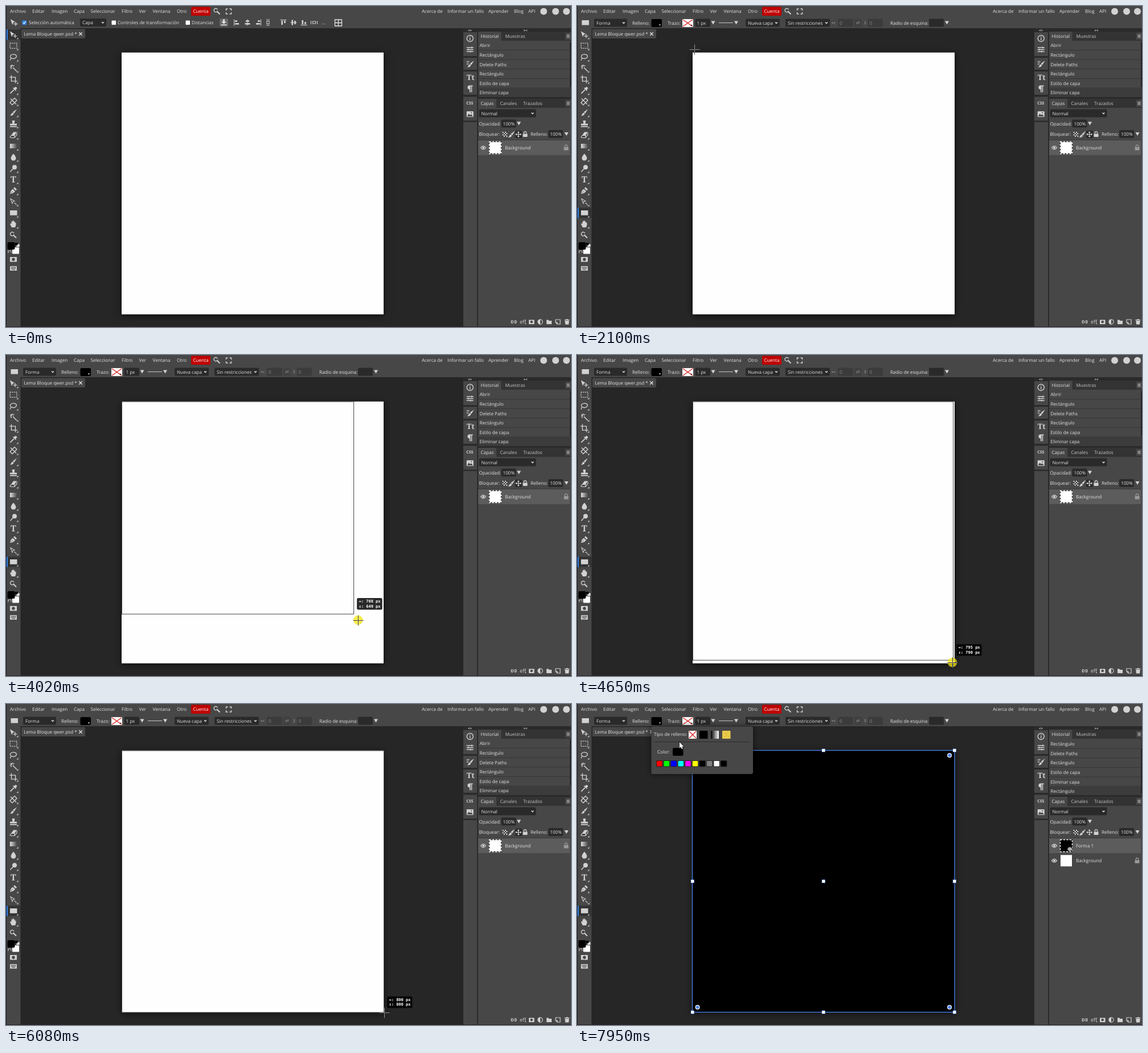
Animation of 992 by 564 pixels, one loop 8 s. Source, as an HTML page with a canvas:

```html
<!DOCTYPE html>
<html lang="es">
<head>
<meta charset="utf-8">
<style>
html, body { margin: 0; width: 100%; height: 100%; overflow: hidden; background: #262626; }
canvas { display: block; }
</style>
</head>
<body>
<canvas id="stage" width="992" height="564"></canvas>
<script>
const c = document.getElementById('stage').getContext('2d');
const LOOP = 8000, ZOOM = 0.575, LEFT = 203, TOP = 81.7, SIZE = 460;
const PANEL = '#474747', DARK = '#2a2a2a', INK = '#e2e2e2', ICON = '#d2d2d2', BLUE = '#4a82ee';

// Pointer track: time, x, y
const track = [
  [70, 815, 543], [260, 650, 500], [540, 220, 402], [820, 24, 366], [890, 19, 365],
  [1230, 19, 365], [1600, 95, 230], [1970, 201, 82], [2100, 206, 76], [2240, 212, 73],
  [2450, 203, 80], [3110, 203, 80], [3330, 276, 157], [3390, 301, 183], [3880, 598, 438],
  [4590, 660, 536], [4650, 659, 540], [4790, 660, 543], [5270, 660, 541], [5410, 660, 541],
  [5470, 664, 542], [6080, 664, 542], [6400, 480, 320], [6700, 253, 64], [6840, 173, 12],
  [6980, 163, 20], [7190, 141, 35], [7530, 141, 35], [7950, 180, 68], [8000, 180, 68]
];

// Monotone cubic interpolation of one coordinate
function coord(t, k) {
  const slope = i => i < 0 || i > track.length - 2 ? 0
    : (track[i + 1][k] - track[i][k]) / (track[i + 1][0] - track[i][0]);
  const tangent = i => {
    const a = slope(i - 1), b = slope(i);
    return a * b > 0 ? 2 * a * b / (a + b) : 0;
  };
  if (t <= track[0][0]) return track[0][k];
  const i = track.findIndex((p, n) => n > track.length - 3 || track[n + 1][0] >= t);
  const p = track[i], q = track[i + 1], h = q[0] - p[0], u = Math.min(1, (t - p[0]) / h);
  const s = u * u * (3 - 2 * u);
  return p[k] + (q[k] - p[k]) * s
    + h * u * (1 - u) * (tangent(i) * (1 - u) - tangent(i + 1) * u);
}
const pointer = t => ({ x: coord(t, 1), y: coord(t, 2) });

function rect(x, y, w, h, color, r = 0) {
  c.fillStyle = color;
  c.beginPath();
  c.roundRect(x, y, w, h, r);
  c.fill();
}
function frame(x, y, w, h, color, width = 1) {
  c.strokeStyle = color;
  c.lineWidth = width;
  c.strokeRect(x, y, w, h);
}
function disc(x, y, r, color) {
  c.fillStyle = color;
  c.beginPath();
  c.arc(x, y, r, 0, 7);
  c.fill();
}
function text(s, x, y, color = INK, font = '8.1px "Open Sans", sans-serif') {
  c.font = font;
  c.fillStyle = color;
  c.fillText(s, x, y + 3);
}
function line(x, y, d, color = ICON, width = 1.1) {
  c.save();
  c.translate(x, y);
  c.strokeStyle = color;
  c.lineWidth = width;
  c.stroke(new Path2D(d));
  c.restore();
}
function solid(x, y, d, color = ICON) {
  c.save();
  c.translate(x, y);
  c.fillStyle = color;
  c.fill(new Path2D(d));
  c.restore();
}
const down = (x, y) => solid(x, y, 'M-3.5-3h7L0 3z');
function select(s, x, y, w) {
  rect(x, y - 7, w, 14, DARK, 2);
  text(s, x + 4, y);
  line(x + w - 6, y, 'M-2-1L0 1 2-1', INK, 1.3);
}
function field(s, x, y, w, color) {
  rect(x, y - 7, w, 14, color ? '#3b3b3b' : DARK, 2);
  text(s, x + 3, y, color);
}
function checkbox(x, on) {
  rect(x, 25.5, 7.5, 7.5, on ? '#2f86f2' : '#fff', 1);
  if (on) line(x + 3.7, 29.2, 'M-2 0L-.5 1.8 2.3-2', '#fff', 1.2);
}
function gradient(x, y, w, h, from, to) {
  const g = c.createLinearGradient(x, 0, x + w, 0);
  g.addColorStop(0, from);
  g.addColorStop(1, to);
  rect(x, y, w, h, g);
}
function noFill(x, y, w, h) {
  rect(x, y, w, h, '#fff', 1);
  line(x, y, `M1 1L${w - 1} ${h - 1}M${w - 1} 1L1 ${h - 1}`, '#d62020', 1.3);
}
function magnifier(x, y) {
  line(x, y, 'M2 0A3.3 3.3 0 1 1 1.9-2.2', ICON, 1.4);
  line(x, y, 'M1.5 1.5L6 6', ICON, 2);
}
function brush(x, y) {
  solid(x, y, 'M6-6L-1-1 1 2zM-1.5 0L.5 2.5Q-1 6-6 5.5-4 4-3.5 2z');
}
function lock(x, y, color = ICON) {
  rect(x - 4, y - 1, 8, 5.5, color, 1);
  line(x, y, 'M-2.3-1v-1.5a2.3 2.3 0 0 1 4.6 0V-1', color, 1.3);
}
function moveIcon(x, y) {
  solid(x, y, 'M-5-6L3-1 0 0-2 4z');
  line(x, y, 'M4-1v7M.5 2.5h7', ICON, 1.3);
}

function menu(p) {
  rect(0, 0, 992, 39, PANEL);
  const items = [['Archivo', 7], ['Editar', 46], ['Imagen', 80], ['Capa', 119], ['Seleccionar', 148.5],
    ['Filtro', 203], ['Ver', 233.5], ['Ventana', 257.5], ['Otro', 300], ['Acerca de', 730],
    ['Informar un fallo', 775], ['Aprender', 847], ['Blog', 892], ['API', 917]];
  for (const [s, x] of items) {
    const w = c.measureText(s).width;
    if (p && p.y < 18 && p.x > x - 2 && p.x < x + w + 2) rect(x - 2.5, 2, w + 5, 14, '#2e2e2e', 2);
    text(s, x, 9);
  }
  rect(325, 1.5, 34, 15.5, '#c00000', 2);
  text('Cuenta', 328.5, 9, '#fff');
  magnifier(369.5, 8.5);
  line(391, 9.5, 'M-4.5-1.5v-3h3M1.5-4.5h3v3M4.5 1.5v3h-3M-1.5 4.5h-3v-3', ICON, 1.4);
  for (const x of [944, 965, 984]) disc(x, 9.5, 6, ICON);
}

function moveOptions() {
  moveIcon(13, 29);
  checkbox(28.5, true);
  text('Selección automática', 40, 29);
  select('Capa', 130, 29, 46);
  checkbox(185.5);
  text('Controles de transformación', 196, 29);
  checkbox(315.5);
  text('Distancias', 326, 29);
  rect(375, 22, 15, 14, '#6a6a6a', 2);
  solid(382.5, 28.5, 'M-1.5-5h3v4h3L0 3-4.5-1h3zM-5 4H5v1.5H-5z', INK);
  [[405, 0], [424, 1], [443, 2], [487, 3], [505, 4], [523, 5]].forEach(([x, n]) => {
    c.save();
    c.translate(x, 29);
    if (n > 2) c.rotate(Math.PI / 2);
    const k = (n % 3 - 1) * (n > 2 ? -1 : 1) || 0;
    const side = n > 2 ? -k : k;
    line(side * 4.5, 0, 'M0-5.5V5.5');
    rect(side < 0 ? -3 : side > 0 ? -1 : -3, -3.8, 4 + (side ? 0 : 2), 2.6, ICON);
    rect(side < 0 ? -3 : side > 0 ? -4 : -4.5, 1, side ? 7 : 9, 2.6, ICON);
    c.restore();
  });
  line(460, 29, 'M-3-5H3M-3 5H3M-2-2.5H2v5H-2z');
  line(541, 29, 'M-5.5-3v6M5.5-3v6M-2.5-2h5v4h-5z');
  text('...', 554, 29);
  line(583.5, 29.5, 'M-6-5.5H6v11H-6zM0-5.5v11M-6 0H6', INK, 1.3);
}

function shapeOptions() {
  rect(8.5, 25, 12.5, 8.5, ICON);
  select('Forma', 30, 29.5, 58);
  text('Relleno:', 97, 29.5);
  rect(130.5, 23, 18.5, 14, '#000', 2);
  solid(145.5, 33.5, 'M-1.8-1h3.6L0 1z', '#fff');
  text('Trazo:', 159, 29.5);
  noFill(185, 23, 19, 14);
  solid(201, 34, 'M-1.8-1h3.6L0 1z', '#222');
  field('1 px', 207.5, 29.5, 26.5);
  down(239, 29.5);
  line(249, 29.5, 'M0 0h25', '#bbb');
  down(279.5, 29.5);
  select('Nueva capa', 296, 29.5, 60);
  select('Sin restricciones', 366, 29.5, 78);
  text('↔:', 447, 29, '#999', '7px "DejaVu Sans", sans-serif');
  field('0', 458, 29.5, 26.5, '#8a8a8a');
  rect(487, 22.5, 13, 14, '#414141', 2);
  text('⇄', 490, 29, '#888', '8px "DejaVu Sans", sans-serif');
  text('↕:', 503, 29, '#999', '7px "DejaVu Sans", sans-serif');
  field('0', 510.5, 29.5, 26.5, '#8a8a8a');
  text('Radio de esquina:', 550, 29.5);
  field('0 px', 618, 29.5, 26, '');
  down(649.5, 29.5);
}

const tools = [
  (x, y) => moveIcon(x - 1, y),
  (x, y) => {
    c.setLineDash([2, 1.4]);
    frame(x - 6, y - 4.5, 12, 9, ICON, 1.2);
    c.setLineDash([]);
  },
  (x, y) => line(x, y, 'M-4 2C-8-2-3-5 1-4.5S7-1 4 1.5-2 3-4 2c-1.5 1-.5 3-2 4', ICON, 1.3),
  (x, y) => line(x, y, 'M6 6L-1-1M-2-6v3M-6-2h3M-5-5l2 2M1-5L0-3M-5 1l2-1', ICON, 1.5),
  (x, y) => line(x, y, 'M-3.5-7V3.5H7M-7-3.5H3.5V7', ICON, 1.4),
  (x, y) => {
    solid(x, y, 'M1-4l2-2q4 0 3 3L4-1l1 1-1 1-5-5 1-1z');
    line(x, y, 'M1-1L-4 4-5.5 5.5', ICON, 1.8);
  },
  (x, y) => line(x, y, 'M-6 2L2-6 6-2-2 6zM-2-2L2 2M-5-5L5 5', ICON, 1.4),
  brush,
  (x, y) => solid(x, y, 'M-2.5-5.5h5L1.5 0H6v3H-6V0h4.5zM-6 4.2H6V6H-6z'),
  (x, y) => {
    solid(x, y, 'M0-5h6L2 1h-6z');
    line(x, y, 'M-4 1h6v4h-6l-2-1zM2 5l4-5v-4', ICON, 1.1);
  },
  (x, y) => gradient(x - 6, y - 4, 12, 8, '#e0e0e0', '#4a4a4a'),
  (x, y) => solid(x, y, 'M0-6Q4.5-1 4.5 2A4.5 4 0 0 1-4.5 2Q-4.5-1 0-6z'),
  (x, y) => {
    disc(x + 2, y - 2, 4, ICON);
    line(x, y, 'M0 0L-5.5 6', ICON, 1.5);
  },
  (x, y) => text('T', x - 5, y + 2, ICON, 'bold 15px "Noto Serif", serif'),
  (x, y) => {
    solid(x, y, 'M2-6l4 4-2 2-4-4zM-1-2.5L3 1Q1 5-6 6-5-1-1-2.5z');
    line(x, y, 'M-5 5l4-4', PANEL, .8);
  },
  (x, y) => {
    line(x, y, 'M-5-5L2-1-1 0-2 3z', ICON, 1.1);
    line(x, y, 'M1 3q3-2 4 3', ICON, 1.1);
  },
  (x, y) => rect(x - 6, y - 4.3, 12.5, 8.6, ICON),
  (x, y) => solid(x, y, 'M-3 6L-6 0q1-2 2.5 0V-4q1-1.5 2 0v-1.5q1-1.5 2 0v1.5q1-1.5 2 0v2q1.5-1 2 0V2L3 6z'),
  (x, y) => magnifier(x - 1, y - 1)
];

function toolbar(active, p) {
  rect(1, 39, 24.5, 525, PANEL);
  tools.forEach((draw, i) => {
    const y = 50.3 + i * 19.57;
    const hover = p && p.x < 25 && Math.abs(p.y - y) < 9;
    if (i === active || hover) rect(3, y - 9, 22, 18, '#333');
    if (i === active) rect(1, y - 9, 2, 18, '#2f86f2');
    draw(13, y);
    if (i < 18) solid(20, y + 6.5, 'M1.5-1.5v3h-3z');
  });
  rect(11, 424, 12, 11.5, '#fff', 1);
  rect(2.5, 415, 13, 13, '#000', 2);
  rect(18.5, 418.5, 5, 4.5, '#fff');
  rect(16, 416, 4.5, 4.5, '#000');
  line(7, 431, 'M-3 2v-3h5M2-1v4M-3 0v3', '#bbb', 1);
  rect(7, 441, 12, 8.5, ICON);
  disc(13, 445.2, 2.7, PANEL);
  rect(7, 457, 12, 8, ICON, 1);
  line(13, 461, 'M-4.5-2h9M-4.5 0h9M-3 2.2h6', PANEL, 1);
}

function iconStrip() {
  rect(802, 39, 190, 525, DARK);
  text('<>', 811, 42, INK, 'bold 6px "Open Sans", sans-serif');
  text('><', 908.5, 42, INK, 'bold 6px "Open Sans", sans-serif');
  for (const [y, h] of [[46, 42], [91, 21], [115, 41], [159.5, 42], [204, 360]]) rect(803, y, 24, h, PANEL);
  const x = 814.7;
  line(x, 57, 'M5.5 0A5.5 5.5 0 1 1 5.5-.1M0-3.4v1.5M0-1v4.5', ICON, 1.3);
  line(x, 76.5, 'M-6-3.5H6M-6 0H6M-6 3.5H6M3-5v3M-3-1.5v3M1 2v3', ICON, 1.3);
  brush(x + 1, 102);
  line(x, 101.5, 'M-6-4h5M-6-1.5h4M-6 1h3', ICON, 1.1);
  text('Tt', x - 6, 127, ICON, 'bold 13px "Noto Serif", serif');
  solid(x, 145.5, 'M5-6v1.5H3.5V6H2V-4.5H.8V6H-.8V1a3.5 3.5 0 0 1 0-7z');
  text('CSS', x - 6.5, 170, ICON, 'bold 7px "Open Sans", sans-serif');
  rect(x - 6, 185, 12, 10, ICON, 1);
  solid(x, 190, 'M-5 4l3-5 2 3 2-2 3 4z', PANEL);
  disc(x + 2.5, 187.5, 1, PANEL);
}

function tabs(names, y) {
  rect(829, y - 8, 163, 16, '#333');
  names.forEach(([s, x], i) => {
    if (!i) rect(829, y - 8, c.measureText(s).width + 9, 16, PANEL);
    text(s, x, y, i ? '#c4c4c4' : INK);
  });
  rect(982, y - 6, 10, 12, PANEL);
  line(987, y, 'M-2.5-2h5M-2.5 0h5M-2.5 2h5', ICON, .9);
}

function layer(name, y, on, thumb, shape) {
  if (on) rect(829, y - 13, 161, 26, '#5c5c5c');
  line(838, y, 'M-4.5 0Q0-6 4.5 0 0 6-4.5 0z', INK, 1.1);
  disc(838, y, 1.8, INK);
  rect(849, y - 10, 20, 20, thumb);
  if (on) {
    frame(848.5, y - 10.5, 21, 21, '#222', 1.4);
    c.setLineDash([3, 2.5]);
    frame(848.5, y - 10.5, 21, 21, '#fff', 1.4);
    c.setLineDash([]);
  }
  if (shape) {
    rect(861, y + 2, 8.5, 8, '#222');
    line(865.3, y + 6, 'M-2.5-2h5v4h-5zM-4 0h8M0-3.5v7', '#fff', .9);
  } else lock(983.5, y, '#999');
  text(name, 876, y);
}

function sidePanels(drawn) {
  rect(829, 46, 163, 518, PANEL);
  text('', 0, 0);
  tabs([['Historial', 833.5], ['Muestras', 876.5]], 53);
  const steps = ['Abrir', 'Rectángulo', 'Delete Paths', 'Rectángulo', 'Estilo de capa', 'Eliminar capa', 'Rectángulo'];
  steps.slice(drawn ? 1 : 0, drawn ? 7 : 6).forEach((s, i) => {
    const y = 69.2 + i * 16.65 + (drawn ? .7 : 0);
    if (i === 5) rect(829, y - 8, 161, 16, '#3c3c3c');
    text(s, 831.5, y);
    rect(829, y + 7.8, 161, 1, '#363636');
  });
  rect(990, 61, 2, 99, '#333');
  rect(990, drawn ? 79 : 64, 2, 78, '#202020');
  rect(829, 160, 163, 3, DARK);
  tabs([['Capas', 833.5], ['Canales', 867.5], ['Trazados', 908]], 171);
  select('Normal', 830.5, 188.5, 100);
  text('Opacidad:', 830.5, 206.5);
  field('100%', 869.5, 206.5, 26);
  down(900.5, 206.5);
  text('Bloquear:', 830.5, 225);
  for (let i = 0; i < 16; i++) rect(871.5 + i % 4 * 2.2, 221 + (i >> 2) * 2.2, 2.2, 2.2, (i + (i >> 2)) % 2 ? '#333' : '#ddd');
  brush(887.5, 225.5);
  if (!drawn) rect(894, 219, 12, 13, DARK, 2);
  line(899.7, 225.5, 'M-4.5 0h9M0-4.5v9M-3-1.5L-4.5 0-3 1.5M3-1.5L4.5 0 3 1.5M-1.5-3L0-4.5 1.5-3M-1.5 3L0 4.5 1.5 3');
  lock(911.5, 225.5);
  text('Relleno:', 921, 225);
  field('100%', 952, 225, 26);
  down(984, 225);
  rect(829, 235, 161, 1, '#3a3a3a');
  if (drawn) layer('Forma 1', 249, true, '#000', true);
  layer('Background', drawn ? 275.3 : 249, !drawn, '#fff');

  const y = 555;
  line(891.5, y, 'M-1-1.8h-3.2v3.6H-1M1-1.8h3.2v3.6H1M-2 0h4', ICON, 1.2);
  text('eff', 902, y - .5, ICON, '9px "Open Sans", sans-serif');
  solid(912, y + 3, 'M1-1v2h-2z');
  rect(918, y - 3.5, 9.5, 7.5, ICON);
  disc(922.7, y, 2.3, PANEL);
  line(938, y, 'M4.2 0A4.2 4.2 0 1 1 4.2-.1');
  solid(938, y, 'M0-4.2A4.2 4.2 0 0 0 0 4.2z');
  solid(953.5, y, 'M-4.5-3.5H-1L0-2h4.5v6h-9z');
  line(969, y, 'M-4 1v-5h8v8H-1zM-4 1h3v3', ICON, 1.2);
  solid(985, y, 'M-4.5-4h3v-1h3v1h3v1.3h-9zM-3.7-2h7.4L3 4.5h-6z');
}

function documentArea(drawn) {
  c.save();
  c.shadowColor = '#000a';
  c.shadowBlur = 12;
  c.shadowOffsetY = 2;
  rect(LEFT, TOP, SIZE, SIZE, drawn ? '#000' : '#fefefe');
  c.restore();
  rect(27, 40.5, 112, 16.5, PANEL, 2);
  text('Lema Bloque qwer.psd *', 31.5, 49);
  line(131, 49, 'M-2.7-2.7l5.4 5.4M2.7-2.7l-5.4 5.4', INK, 1.3);
  if (!drawn) return;
  frame(LEFT - .5, TOP - .2, SIZE + .5, SIZE, BLUE, 1.3);
  for (let i = 0; i < 9; i++) {
    const u = i % 3 / 2, v = (i / 3 | 0) / 2, x = LEFT - .2 + u * SIZE, y = TOP - .2 + v * SIZE;
    rect(x - 3, y - 3, 6, 6, BLUE);
    rect(x - 2.5, y - 2.5, 5, 5, '#fff');
    if (u !== .5 && v !== .5) {
      const dx = x + (.5 - u) * 17.5, dy = y + (.5 - v) * 17.5;
      disc(dx, dy, 4, '#fff');
      disc(dx, dy, 2.8, BLUE);
    }
  }
}

function dragBox(t) {
  const p = pointer(t - 60);
  const px = (v, from) => {
    const n = Math.max(0, Math.round((v - from) / ZOOM));
    return n > 797 ? 800 : n;
  };
  const w = px(p.x, LEFT), h = px(p.y, TOP);
  if (!w || !h) return;
  frame(LEFT + .5, TOP + .3, w * ZOOM, h * ZOOM, '#444');
  const x = LEFT + w * ZOOM + 6, y = TOP + h * ZOOM - 28;
  rect(x, y, 44.5, 20.5, 'rgba(0,0,0,.84)', 2.5);
  const mono = 'bold 7px "DejaVu Sans Mono", monospace';
  text('↔: ' + w + ' px', x + 3.5, y + 5.5, '#fff', mono);
  text('↕: ' + h + ' px', x + 3.5, y + 13.7, '#fff', mono);
}

function fillPopup() {
  c.save();
  c.shadowColor = '#0009';
  c.shadowBlur = 12;
  rect(130.5, 39.5, 178.5, 83.5, PANEL, 3);
  c.restore();
  text('Tipo de relleno:', 135, 53);
  noFill(196, 47, 14, 14);
  rect(215, 47, 14.5, 14, '#000', 1);
  gradient(235, 47, 14, 14, '#000', '#fff');
  rect(255, 47, 14.5, 14, '#e9cb4b', 1);
  line(262, 54, 'M-5-3l4 2 3-4M-4 4l5-3 4 4', '#d9b535', 1);
  rect(135.5, 66, 168.5, 1, '#2c2c2c');
  text('Color:', 141, 83.5);
  rect(168, 77, 18.5, 14, '#000', 2);
  ['#f00', '#0f0', '#00f', '#0ff', '#f0f', '#ff0', '#000', '#808080', '#fff', '#000'].forEach((color, i) => {
    const x = 139 + i * 12.55;
    rect(x, 99, 11.5, 11.5, '#222', 1.5);
    rect(x + 1, 100, 9.5, 9.5, color, 1);
  });
}

// Yellow disc while the button is held, widening and fading on release
function press(t, p, from, to) {
  if (t < from || t > to + 200) return;
  const out = Math.max(0, (t - to) / 200), start = Math.max(0, 1 - (t - from) / 140);
  c.globalAlpha = .74 * (1 - out);
  disc(p.x, p.y, 8.3 + 2.5 * Math.max(out, start), '#f2e610');
  c.globalAlpha = 1;
}

function cursor(p, cross) {
  if (cross) {
    c.save();
    c.globalCompositeOperation = 'difference';
    line(Math.round(p.x) + .5, Math.round(p.y) + .5, 'M-9 0H9M0-9V9', '#b8b8b8', 1);
    c.restore();
  } else {
    const arrow = 'M0-1V9.5L2.4 7.3 4 11 5.8 10.2 4.2 6.8H7.4z';
    line(p.x, p.y, arrow, '#111', 1.3);
    solid(p.x, p.y, arrow, '#fff');
  }
}

function draw(t) {
  const p = t < 70 ? null : pointer(t);
  const shapeTool = t >= 1230, drawn = t >= 6150;
  c.textRendering = 'geometricPrecision';
  c.font = '8.1px "Open Sans", sans-serif';
  rect(0, 0, 992, 564, '#262626');
  documentArea(drawn);
  menu(p);
  shapeTool ? shapeOptions() : moveOptions();
  toolbar(shapeTool ? 16 : 0, p);
  iconStrip();
  sidePanels(drawn);
  rect(0, 0, 1, 564, '#1c1518');
  rect(0, 563, 992, 1, '#2b2023');
  if (t >= 2510 && !drawn) dragBox(t);
  if (t >= 6700) {
    const hook = 'M-4 4Q1 5 1 1T5-4M-4 4l1-4 3 1M2-4l3 0-1 3';
    line(253.5, 64, hook, '#000', 2.6);
    line(253.5, 64, hook, '#ddd', 1.2);
  }
  if (t >= 7530) fillPopup();
  if (!p) return;
  press(t, p, 890, 960);
  press(t, p, 2450, 5470);
  press(t, p, 7390, 7460);
  if (t < 6700 || t > 6740) cursor(p, shapeTool && p.x > 25 && t < 6700);
}

function tick(now) {
  draw(now % LOOP);
  requestAnimationFrame(tick);
}
requestAnimationFrame(tick);
</script>
</body>
</html>
```
